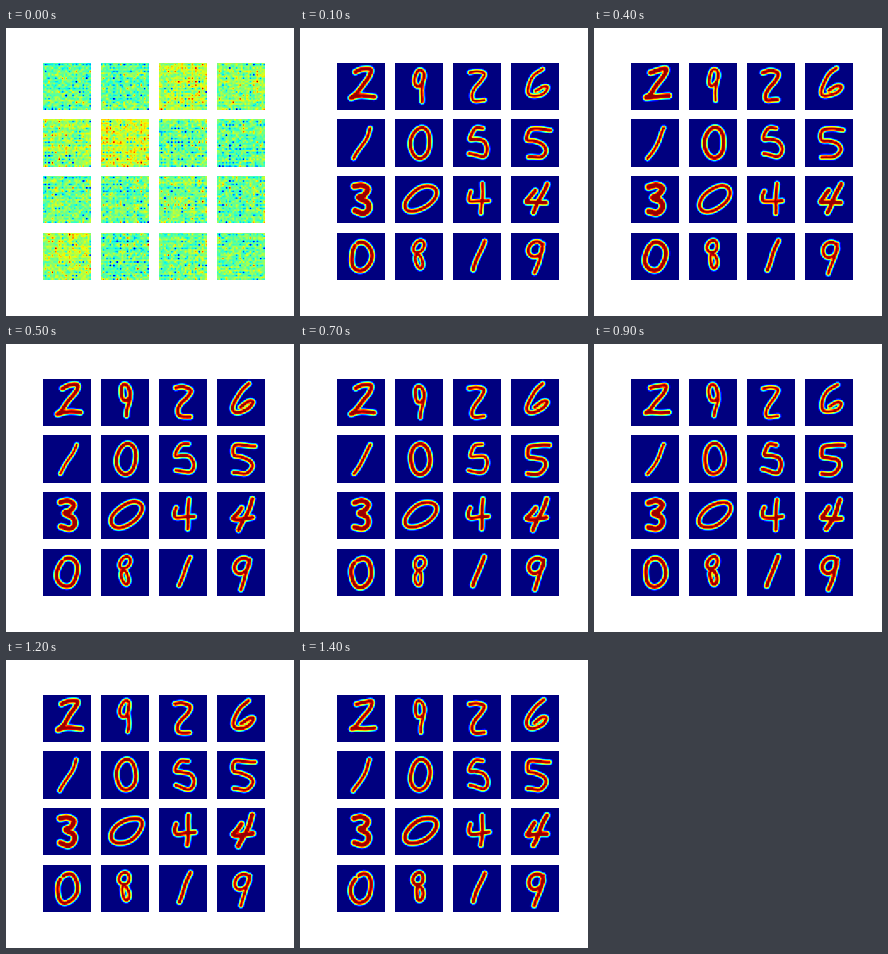
Write a matplotlib script that moves like this. It is 288 by 288 pixels and loops after 1.5 s.

```python
import numpy as np
import matplotlib.pyplot as plt
from matplotlib.animation import FuncAnimation

N = 28                      # cells along each side of a tile
FRAMES, STEP = 15, 100
YY, XX = np.mgrid[0:N, 0:N] + .5


def curve(*pts, n=12):
    """Sample a Catmull-Rom curve through a few key points."""
    p = np.array(pts, float)
    q = np.vstack([2 * p[0] - p[1], p, 2 * p[-1] - p[-2]])
    t = np.linspace(0, 1, n)[:, None]
    return np.vstack([b + t * (c - a) / 2
                      + t**2 * (2 * a - 5 * b + 4 * c - d) / 2
                      + t**3 * (3 * b - a - 3 * c + d) / 2
                      for a, b, c, d in zip(q, q[1:], q[2:], q[3:])])


def ring(cx, cy, rx, ry, lean=0, start=0, end=360):
    """Sample an ellipse whose top leans to the right."""
    t = np.radians(np.linspace(start, end, 100))
    a = np.radians(lean)
    u, v = rx * np.cos(t), ry * np.sin(t)
    return np.column_stack([cx + u * np.cos(a) - v * np.sin(a),
                            cy + u * np.sin(a) + v * np.cos(a)])


def digit(radius, wobble, *strokes):
    return radius, wobble, np.vstack(strokes)


digits = [
    # 2, 9, 2, 6
    digit(1.55, .4, curve((11, 6), (15, 4.6), (20, 4.2), (19, 8), (15, 13.5), (11.5, 18.5),
                          (8.5, 20.8), (13, 20), (22, 20))),
    digit(1.25, .6, ring(14, 9, 2.6, 4.8, 4), curve((16.2, 6), (16.3, 14), (15.2, 22.5))),
    digit(1.3, .3, curve((9.5, 6), (14, 5.2), (18.3, 7), (16.5, 11), (13, 15), (11, 19),
                         (12, 22.3), (18, 22.3))),
    digit(1.3, .4, curve((18.8, 3.7), (13.5, 8), (10, 14), (9.8, 18.5), (13, 20), (18.5, 18.2),
                         (21, 14.5), (18.5, 14), (14, 17))),
    # 1, 0, 5, 5
    digit(1.2, .4, curve((19.3, 5.3), (17, 11), (13.8, 16.5), (9.8, 23))),
    digit(1.4, .25, ring(14.8, 14, 5.6, 8.9, 4)),
    digit(1.3, .4, curve((17, 5.6), (13, 5.7), (10.8, 8.5), (10, 12), (14, 12.2), (18.5, 13.2),
                         (20.2, 17.5), (17.5, 22), (9.5, 20.3))),
    digit(1.3, .4, curve((22.5, 6.2), (16, 6), (10.5, 6.7), (9.5, 12), (14, 13.2), (19, 15),
                         (20.5, 18.5), (17, 22.5), (10, 22.2))),
    # 3, 0, 4, 4
    digit(1.85, .25, curve((10, 6.8), (14.5, 5.9), (18, 8), (16, 11.5), (13, 13.2), (17.8, 15.8),
                           (18.2, 19.8), (15, 22.2), (10.3, 21))),
    digit(1.4, .25, ring(15, 13.9, 5.7, 10.2, 56)),
    digit(1.35, .25, curve((10.2, 9.7), (9.2, 13), (10, 15.5), (15, 15.5), (20.8, 14.8)),
          curve((17.3, 5), (17, 14), (16.5, 22.3))),
    digit(1.6, .4, curve((14, 9.5), (11.3, 13.3), (9.5, 16), (14, 16.2), (20.8, 15.8)),
          curve((20.8, 5), (17, 14), (12.8, 22.3))),
    # 0, 8, 1, 9
    digit(1.5, .4, ring(14.2, 14.3, 5.8, 8.5, 12, -125, 215)),
    digit(1.25, .6, ring(14, 9, 3, 3.5, 10), ring(14, 17.5, 1.9, 4.2, -5)),
    digit(1.5, .25, curve((18.4, 5.2), (15, 13), (11.8, 22))),
    digit(1.35, .25, ring(14.5, 10.2, 3.9, 4.7, 35), curve((18.8, 7), (17, 15), (13.7, 24))),
]


def draw(tile, step):
    """A fresh sample of the digit: same strokes, gently bent and reweighted."""
    radius, wobble, pts = digits[tile]
    rng = np.random.default_rng(100 * tile + step)
    phase = rng.uniform(0, 2 * np.pi, 2)
    pts = pts + wobble * np.sin(.35 * pts[:, ::-1] + phase)
    dist = np.hypot(XX[..., None] - pts[:, 0], YY[..., None] - pts[:, 1]).min(-1)
    return np.clip(.5 + (radius + rng.normal(0, .07) - dist) / 1.4, 0, .98)


def noise(tile):
    """Untrained output: striped ground with strong cells on a lattice."""
    rng = np.random.default_rng(tile + 7)
    warm = {2: .6, 5: .62, 12: .59, 3: .55, 4: .55}
    img = warm.get(tile, .51) + rng.normal(0, .06, (N, N))
    img += rng.normal(0, .025, (N, 1)) + rng.normal(0, .02, (1, N))
    img[1::2] -= .05
    img[::2, 1::2] -= .02
    img[1::2, 1::2] += rng.normal(0, .17, (N // 2, N // 2))
    return np.clip(img, 0, 1)


movie = [[draw(k, f) if f else noise(k) for k in range(16)] for f in range(FRAMES)]

fig, axes = plt.subplots(4, 4, figsize=(4, 4), dpi=72, facecolor="white")
fig.subplots_adjust(left=.125, right=.9, bottom=.125, top=.88, wspace=.2, hspace=.2)
tiles = []
for ax, img in zip(axes.flat, movie[0]):
    ax.axis("off")
    tiles.append(ax.imshow(img, cmap="jet", vmin=0, vmax=1))


def update(f):
    for tile, img in zip(tiles, movie[f]):
        tile.set_data(img)
    return tiles


anim = FuncAnimation(fig, update, frames=FRAMES, interval=STEP, repeat=True, repeat_delay=0)
plt.show()
```
